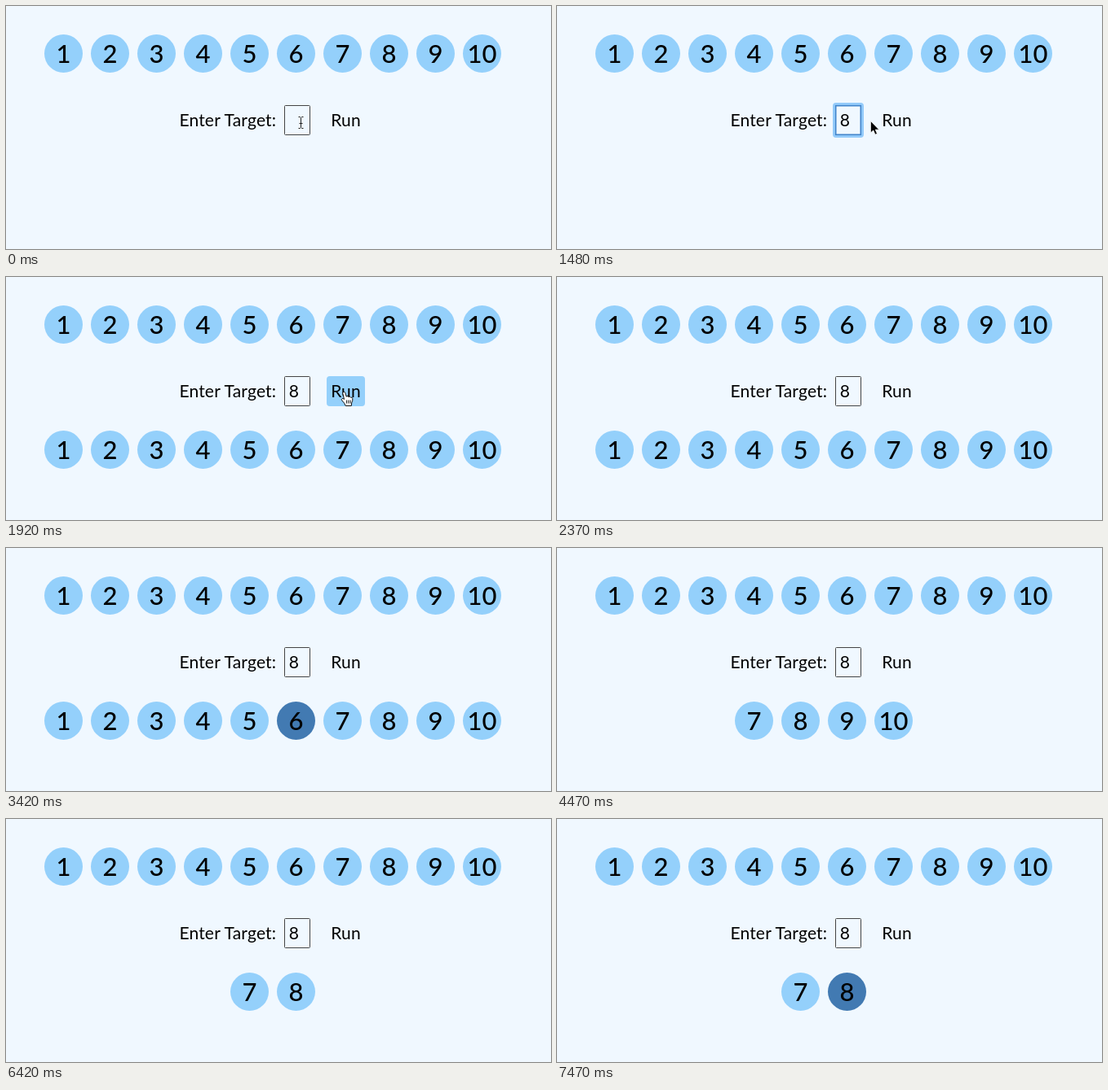
These frames come from a looping animation (668 by 299 pixels, 8000 ms). An HTML page:

```html
<!DOCTYPE html>
<html lang="en">
<head>
<meta charset="utf-8">
<title>Binary search</title>
<style>
  html, body { margin: 0; width: 100%; height: 100%; overflow: hidden; background: #f0f8ff; }
  svg { display: block; width: 668px; height: 299px; }
  text { font: 21px Lato, "Open Sans", sans-serif; letter-spacing: .2px; }
  .ball text { font-size: 31px; font-weight: 500; letter-spacing: 0; text-anchor: middle; }
  .ball circle { fill: #94d0fb; }
  .ball.mid circle { fill: #427ab2; }
</style>
</head>
<body>
<svg viewBox="0 0 668 299">
  <g id="list"></g>
  <text x="212.4" y="148">Enter Target:</text>
  <rect x="341.5" y="122.5" width="31" height="36" rx="1" fill="none" stroke="#444"/>
  <g id="ring" fill="none">
    <rect x="339.5" y="120.5" width="35" height="40" rx="2.5" stroke="#94cbfa" stroke-width="3"/>
    <rect x="341.7" y="122.7" width="30.6" height="35.6" stroke="#4285cb" stroke-width="1.6"/>
  </g>
  <text id="typed" x="346.8" y="148">8</text>
  <rect id="caret" y="128" width="1" height="25"/>
  <rect id="hover" x="393" y="122" width="47" height="37" rx="4" fill="#94d0fb"/>
  <text x="398.2" y="148">Run</text>
  <g id="results"></g>

  <path id="beam" d="M358.5 136.5h2l1 1 1-1h2M361.5 137.5v12M358.5 150.5h2l1-1 1 1h2M359.5 144.5h4"
        fill="none" stroke="#222"/>
  <path id="arrow" d="M384.4 141.5v14.6l3.3-3.1 2.3 5.2 2.5-1-2.2-5h4.5z" stroke="#fff" stroke-width=".8"/>
  <path id="hand" d="M414.5 150.5l-1.7-7.2q-.2-2 1.3-2.1 1.3 0 1.8 1.6l1.3 4.3q1.8-1.2 2.7.4 1.8-1 2.6.7 2-.7 2.3 1.3.4 3-1.1 5.3l-.4 3.7h-7.1l-1.5-3.2-3-3.5q-1-1.8.4-2.3 1.2-.2 2.4 1zM417.6 151.5v4M419.9 151.5v4M422.1 151.5v4"
        fill="#fff" stroke="#111"/>
</svg>
<script>
  const LOOP = 8000;
  const $ = id => document.getElementById(id);
  const show = (id, on) => { $(id).style.display = on ? '' : 'none'; };

  // A centred row of the numbers first..last; mid is highlighted.
  function row(y, first, last, mid) {
    let html = '';
    for (let n = first; n <= last; n++) {
      const x = 327 + 57 * (n - (first + last) / 2);
      html += `<g class="ball${n === mid ? ' mid' : ''}">
        <circle cx="${x}" cy="${y}" r="23.5"/><text x="${x}" y="${y + 11}">${n}</text></g>`;
    }
    return html;
  }

  // Start time, first, last, middle
  const steps = [
    [1920, 1, 10], [3420, 1, 10, 6],
    [4470, 7, 10], [5520, 7, 10, 9],
    [6420, 7, 8], [7470, 7, 8, 8]
  ];

  $('list').innerHTML = row(58.5, 1, 10);
  let shown;

  function draw(now) {
    const t = now % LOOP;
    const within = (from, to) => t >= from && t < to;

    show('ring', within(150, 1780));
    show('typed', t >= 1040);
    show('caret', within(150, 590) || within(1040, 1480));
    $('caret').setAttribute('x', t < 1040 ? 347 : 359);
    show('beam', t < 1480);
    show('arrow', within(1480, 1630));
    show('hover', within(1630, 2370));
    show('hand', within(1630, 2370));

    const step = steps.filter(s => t >= s[0]).pop();
    if (step !== shown) {
      shown = step;
      $('results').innerHTML = step ? row(212.5, ...step.slice(1)) : '';
    }
    requestAnimationFrame(draw);
  }
  draw(0);
</script>
</body>
</html>
```
